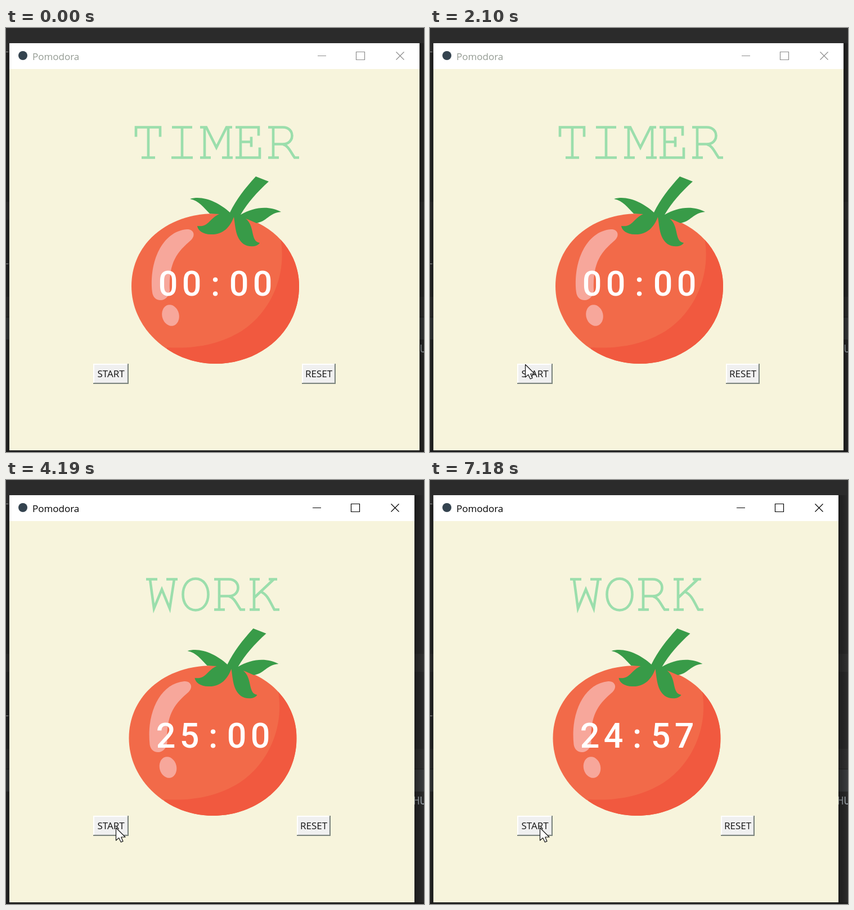
An HTML page that plays this animation: 743x754 px, repeating every 8000 ms.

```html
<!DOCTYPE html>
<html lang="en">
<head>
<meta charset="utf-8">
<title>Pomodora</title>
<style>
  html, body { margin: 0; width: 100%; height: 100%; overflow: hidden; background: #2b2b2b; }
  svg { display: block; width: 100%; height: 100%; }
  .ui { font-family: "Open Sans", "Noto Sans", sans-serif; font-size: 17px; }
  .label { text-anchor: middle; fill: #111; }
  .clock { font: 500 61px Roboto, "Liberation Sans", sans-serif; fill: #fff; text-anchor: middle; }
  .code { font: 19px "Noto Sans Mono", monospace; fill: #a3abb2; }
  .heading { fill: none; stroke: #9bdeac; stroke-width: 4.6; stroke-linejoin: miter; }
</style>
</head>
<body>
<svg viewBox="0 0 743 754">
  <defs>
    <linearGradient id="fade">
      <stop offset="0" stop-opacity=".36"/>
      <stop offset="1" stop-opacity="0"/>
    </linearGradient>
    <clipPath id="skin">
      <path id="body" d="M372 330C460 330 521 388 521 459C521 540 452 597 372 597C292 597 223 535 223 459C223 385 285 330 372 330Z"/>
    </clipPath>
  </defs>

  <rect width="743" height="754" fill="#2b2b2b"/>
  <g id="editor">
    <path fill="#323232" d="M0 309H743V341H0ZM0 478H743V513H0Z"/>
    <path fill="#3b3d3f" d="M0 515H743V554H0Z"/>
    <path stroke="#8a8a8a" d="M0 42.5H4M0 419.5H4"/>
    <text class="code" x="724" y="577">HU</text>
  </g>
  <rect x="0" y="44" width="6" height="374" fill="#000" opacity=".25"/>
  <rect x="0" y="420" width="6" height="334" fill="#000" opacity=".25"/>
  <rect id="shade" y="27" width="17" height="727" fill="url(#fade)"/>
  <rect y="751" width="743" height="3" fill="#000" opacity=".2"/>

  <rect id="page" x="6" y="27" height="724" fill="#f7f4dc"/>
  <rect id="bar" x="6" y="27" height="46" fill="#fff"/>
  <circle cx="30" cy="49" r="8" fill="#34434f"/>
  <text id="title" class="ui" x="47" y="57">Pomodora</text>
  <path id="controls" fill="none" stroke-width="1.2"
        d="M554 49.5H569M622.5 42.5H637.5V56.5H622.5ZM693.5 42.5L707.5 56.5M707.5 42.5L693.5 56.5"/>

  <g id="heading" class="heading" role="img"></g>

  <g id="tomato">
    <use href="#body" fill="#f26a49"/>
    <path clip-path="url(#skin)" fill="#f1593f"
          d="M488 374C500 440 470 505 420 538C380 563 335 571 286 568V600H530V374Z"/>
    <path fill="#f7a79b"
          d="M321 358C333 357 338 368 329 377C305 398 289 415 291 467C290 477 283 484 275 484C266 484 261 478 260 470C254 415 278 362 321 358Z"/>
    <ellipse cx="292.5" cy="511" rx="15" ry="19" transform="rotate(-14 292.5 511)" fill="#f7a79b"/>
    <path fill="#389b48"
          d="M444 264L467 273C446 292 430 310 417 332C440 319 466 315 489 327C467 329 464 344 445 347C438 344 433 341 426 339C443 352 434 380 451 382C447 390 430 390 422 384C408 373 408 355 405 336C398 355 385 368 364 367C350 367 341 360 340 352C360 355 362 338 379 331L362 330C351 319 343 307 327 304C350 297 378 310 398 328C410 304 424 286 444 264Z"/>
  </g>
  <text id="clock" class="clock" y="476"></text>

  <g id="start"></g>
  <g id="reset"></g>

  <circle id="click" cx="196" cy="618" r="18" fill="#f5ee3a" opacity=".66"/>
  <path id="resize" fill="#fff" stroke="#111" stroke-width="1.2" d="M-2 439.5H9V434L17 441.5L9 449V443.5H-2Z"/>
  <path id="arrow" fill="#fff" stroke="#111" stroke-width="1.2" stroke-linejoin="round"
        d="M.5 .5V23L5.7 18.4L9.3 26L13 24.4L9.7 17H17Z"/>
</svg>
<script>
const LOOP = 8000;
const MOVE = 1460, STEP = 770 / 17, PRESS = 4010, RELEASE = 4190;
const TICKS = [5170, 6210, 7180];

// Slab letters, drawn around the middle of a 60 px cell
const GLYPHS = {
  T: "M-22 17V0H21V17M0 0V54M-12 54H12",
  I: "M-18 0H18M0 0V54M-19 54H19",
  M: "M-28 0H-17L1 36L19 0H29M-20 0V54M22 0V54M-28 54H-9M11 54H30",
  E: "M-25 0H16V15M-16 0V54M-16 26H3M3 17V35M-25 54H18V36",
  R: "M-27 0H-1C21 0 21 30 -1 30H-18M-18 0V54M-27 54H-8M-1 30C9 33 13 44 20 54H28",
  W: "M-28 0H-8M8 0H28M-21 0L-14 52L0 18L14 52L22 0",
  O: "M0-1C30-1 30 55 0 55C-30 55-30-1 0-1Z",
  K: "M-24 0H-6M-16 0V54M-24 54H-6M10 0H25M19 0L-16 33M-4 22C9 28 13 42 20 54H29"
};

// Pointer keys: time, x, y
const PATH = [
  [1505, 12, 423], [1550, 30, 408], [1595, 52, 403], [1685, 91, 423], [1822, 133, 485],
  [1912, 141, 535], [2003, 150, 573], [2094, 169, 598], [2230, 197, 620],
  [2280, 199, 620], [2560, 198, 620], [2650, 196, 619], [2740, 195, 618]
];

const $ = id => document.getElementById(id);
const set = (id, attrs) => {
  for (const key in attrs) $(id).setAttribute(key, attrs[key]);
};
const show = (id, on) => set(id, { visibility: on ? "visible" : "hidden" });
const box = (x, y, w, h, fill) =>
  `<rect x="${x}" y="${y}" width="${w}" height="${h}" fill="${fill}"/>`;

function button(id, label, x, w, down) {
  const [light, dark] = down ? ["#7d857f", "#fff"] : ["#fff", "#7d857f"];
  $(id).innerHTML =
    box(x, 597, w, 36, dark) +
    box(x, 597, w - 2, 34, light) +
    box(x + 2, 599, w - 4, 32, down ? "#f0f0f0" : "#e0e0e0") +
    box(x + 2, 599, w - 5, 31, "#f0f0f0") +
    `<text class="ui label" x="${x + w / 2 + (down ? 1.5 : 0)}" y="${down ? 622 : 621}">${label}</text>`;
}

function heading(word, mid) {
  const left = mid - (word.length - 1) * 30;
  $("heading").innerHTML = [...word].map((c, i) =>
    `<path transform="translate(${left + i * 60} 176.5)" d="${GLYPHS[c]}"/>`).join("");
  set("heading", { "aria-label": word });
}

function clock(left, mid) {
  const two = n => String(n).padStart(2, "0");
  $("clock").textContent = two(Math.floor(left / 60)) + ":" + two(left % 60);
  set("clock", { x: [-2, -1, 0, 1, 2].map(i => mid + i * 42).join(" ") });
}

function pointer(t) {
  if (t < 2230) t = MOVE + Math.floor((t - MOVE) / STEP + 0.01) * STEP;
  else if (t < 2280) t = 2230;
  else if (t < 2560) t = 2280;
  else if (t < 2740) t = t < 2650 ? 2560 : 2650;
  let i = 1;
  while (i < PATH.length - 1 && PATH[i][0] < t) i++;
  const [t0, x0, y0] = PATH[i - 1], [t1, x1, y1] = PATH[i];
  const k = Math.min(1, Math.max(0, (t - t0) / (t1 - t0)));
  return [x0 + (x1 - x0) * k, y0 + (y1 - y0) * k].map(Math.round);
}

function layout(active, down, running, left) {
  const cut = running ? 9 : 0, width = 729 - cut;
  set("page", { width });
  set("bar", { width });
  set("shade", { x: 6 + width });
  set("title", { fill: active ? "#000" : "#939a92" });
  set("controls", { stroke: active ? "#000" : "#8c8c8c", transform: `translate(${-cut} 0)` });
  set("tomato", { transform: `translate(${-cut / 2} 0)` });
  heading(running ? "WORK" : "TIMER", running ? 367 : 373);
  clock(left, running ? 368 : 372);
  button("start", "START", 155, 63, down);
  button("reset", "RESET", 526 - cut, 60, false);
  show("click", down);
}

let last = "";
function draw(t) {
  const active = t >= PRESS, running = t >= RELEASE, down = active && !running;
  const left = running ? 1500 - TICKS.filter(at => t >= at).length : 0;
  const state = [active, down, running, left];
  if (state.join() !== last) {
    last = state.join();
    layout(...state);
  }
  const edge = t >= MOVE && t < MOVE + STEP;
  show("resize", edge);
  show("arrow", t >= MOVE && !edge);
  set("arrow", { transform: `translate(${pointer(t)})` });
}

const begin = performance.now();
function tick() {
  draw((performance.now() - begin) % LOOP);
  requestAnimationFrame(tick);
}
tick();
</script>
</body>
</html>
```
